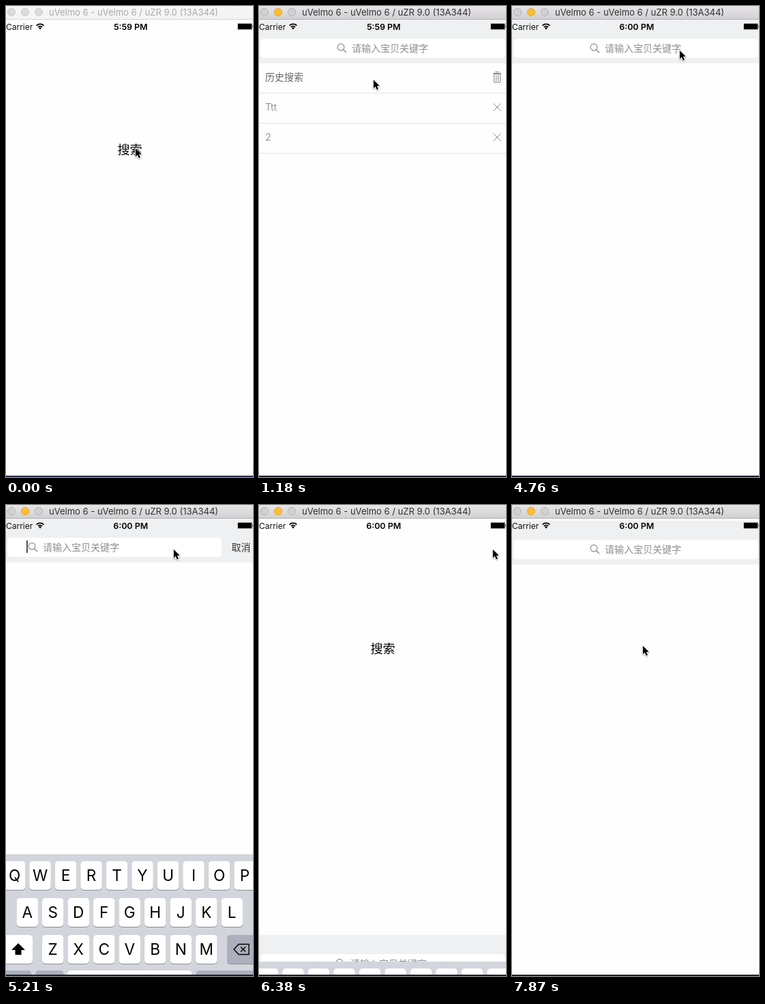
Recreate the animation shown at these times as an HTML page with a canvas. Size 362 px wide and 689 px high, loop 8000 ms.

```html
<!DOCTYPE html>
<html lang="zh">
<head>
<meta charset="utf-8">
<title>Search sheet</title>
<style>
  html, body { margin: 0; width: 100%; height: 100%; overflow: hidden; background: #fff; }
  canvas { display: block; width: 362px; height: 689px; }
</style>
</head>
<body>
<canvas id="stage"></canvas>
<script>
const W = 362, H = 689, LOOP = 8000;
const SCREEN_TOP = 20, SCREEN_H = 667, KEYS_H = 216;
const LATIN = 'Inter, Roboto, sans-serif';
const HAN = '"Noto Sans CJK SC", "Noto Sans CJK", sans-serif';

const canvas = document.getElementById('stage');
const ctx = canvas.getContext('2d');
const dpr = window.devicePixelRatio || 1;
canvas.width = W * dpr;
canvas.height = H * dpr;

// Bursts of motion: first step, last step, number of steps
const BURSTS = [
  [150, 1180, 8], [1630, 2530, 7], [2820, 2820, 1], [3270, 3570, 3],
  [4760, 5790, 8], [5940, 5940, 1], [6240, 7270, 8], [7570, 7870, 3]
];
const STEPS = [0];
for (const [from, to, n] of BURSTS)
  for (let i = 0; i < n; i++) STEPS.push(n > 1 ? from + (to - from) * i / (n - 1) : from);

// Pointer path: time, x, y
const PATH = [
  [0, 189, 207], [590, 189, 207], [1180, 167, 107], [1560, 167, 107],
  [1860, 215, 120], [2080, 265, 127], [2300, 318, 119], [2530, 343, 107],
  [3200, 343, 107], [3420, 280, 78], [3570, 238, 54], [4700, 238, 54],
  [4760, 245, 64], [5360, 245, 64], [5940, 342, 64], [6390, 342, 64],
  [7270, 191, 205], [LOOP, 191, 205]
];

const lerp = (a, b, p) => a + (b - a) * p;

// Critically damped spring from 0 to 1
function spring(t, start, speed = 16.2) {
  const x = Math.max(0, t - start) / 1000 * speed;
  return 1 - (1 + x) * Math.exp(-x);
}

function hold(t) {
  let held = 0;
  for (const s of STEPS) if (s <= t + 8) held = s;
  return held;
}

function pointerAt(t) {
  const i = PATH.findIndex(k => k[0] > t);
  const a = PATH[i - 1], b = PATH[i], p = (t - a[0]) / (b[0] - a[0]);
  return [lerp(a[1], b[1], p), lerp(a[2], b[2], p)];
}

function rect(x, y, w, h, color) {
  ctx.fillStyle = color;
  ctx.fillRect(x, y, w, h);
}

function pill(x, y, w, h, r, color) {
  ctx.fillStyle = color;
  ctx.beginPath();
  ctx.roundRect(x, y, w, h, r);
  ctx.fill();
}

function text(str, x, y, size, color, { font = LATIN, weight = 400, align = 'left' } = {}) {
  ctx.font = `${weight} ${size}px ${font}`;
  ctx.textAlign = align;
  ctx.fillStyle = color;
  ctx.fillText(str, x, y);
}

const han = (str, x, y, size, color, align) => text(str, x, y, size, color, { font: HAN, align });

function trace(points, close) {
  ctx.beginPath();
  points.forEach(([x, y], i) => i ? ctx.lineTo(x, y) : ctx.moveTo(x, y));
  if (close) ctx.closePath();
}

function line(points, color, width) {
  trace(points);
  ctx.strokeStyle = color;
  ctx.lineWidth = width;
  ctx.stroke();
}

function disc(x, y, r, fill, stroke, width = 1) {
  ctx.beginPath();
  ctx.arc(x, y, r, 0, Math.PI * 2);
  if (fill) { ctx.fillStyle = fill; ctx.fill(); }
  if (stroke) { ctx.strokeStyle = stroke; ctx.lineWidth = width; ctx.stroke(); }
}

function titleBar(active) {
  const g = ctx.createLinearGradient(0, 0, 0, 20);
  g.addColorStop(0, active ? '#e7e5e8' : '#f6f6f6');
  g.addColorStop(1, active ? '#d1cfd2' : '#f4f4f4');
  rect(0, 0, W, 20, g);
  rect(0, 19, W, 1, active ? '#b3b1b4' : '#d3d3d3');
  for (const x of [8, 28, 48]) {
    if (active && x === 28) disc(x, 9, 5.6, '#fdbd34', '#dfa12c', 0.8);
    else disc(x, 9, 5.6, active ? '#d2d0d3' : '#dbdbdb', active ? '#b2b0b3' : '#cbcbcb', 0.9);
  }
  text('uVelmo 6 - uVelmo 6 / uZR 9.0 (13A344)', 63, 14, 13, active ? '#303031' : '#a9a9a9');
}

function statusBar(clock) {
  text('Carrier', 0, 34.5, 12, '#111');
  ctx.strokeStyle = '#000';
  ctx.lineWidth = 1.8;
  for (const r of [4.4, 7.6]) {
    ctx.beginPath();
    ctx.arc(50, 34, r, -Math.PI * 0.75, -Math.PI * 0.25);
    ctx.stroke();
  }
  ctx.beginPath();
  ctx.moveTo(50, 34.5);
  ctx.arc(50, 34, 2.6, -Math.PI * 0.78, -Math.PI * 0.22);
  ctx.fillStyle = '#000';
  ctx.fill();
  text(clock, 182.7, 34.5, 12.4, '#000', { weight: 600, align: 'center' });
  pill(339, 25, 22, 10, 1.5, '#b5b5b5');
  rect(340, 26, 20, 8, '#000');
  rect(361, 28, 1, 4, '#777');
}

function cross(y) {
  line([[343.5, y - 5.5], [354.5, y + 5.5]], '#8c8c8c', 1);
  line([[354.5, y - 5.5], [343.5, y + 5.5]], '#8c8c8c', 1);
}

function trash() {
  ctx.strokeStyle = '#858585';
  ctx.lineWidth = 1;
  ctx.strokeRect(344.5, 99.5, 9, 12);
  line([[343, 98.5], [355, 98.5]], '#858585', 1);
  line([[346, 96.5], [352, 96.5]], '#858585', 1);
  for (const x of [347.5, 350.5]) line([[x, 101], [x, 110]], '#858585', 1);
}

function history() {
  han('历史搜索', 9, 109, 14, '#666');
  trash();
  text('Ttt', 9, 153, 14.5, '#999');
  text('2', 9, 197, 14.5, '#999');
  cross(148);
  cross(192);
  for (const y of [127, 171, 215]) rect(0, y, W, 1, '#e4e4e4');
}

function searchHeader(s) {
  rect(0, 20, W, 64, '#eff0f2');
  pill(2, 48, s.editing ? 314 : 359, 28, 5, '#fff');
  const x = lerp(136, 31, s.shift);
  disc(x - 16, 60.3, 4.9, null, '#8e8e93', 1.2);
  line([[x - 12.5, 63.8], [x - 8, 68.2]], '#8e8e93', 1.5);
  han('请输入宝贝关键字', x, 66.6, 14, '#8e8e93');
  if (s.caret) rect(30, 52, 1.7, 18, '#333');
  if (s.editing) han('取消', 330.5, 66.5, 14, '#333');
}

function key(x, y, w, dark) {
  pill(x, y + 1, w, 42, 5, '#8b8e93');
  pill(x, y, w, 42, 5, dark ? '#abb0bc' : '#fff');
}

function letters(row, x, y) {
  [...row].forEach((ch, i) => {
    const cx = x + i * 37.5;
    key(cx - 15.75, y, 31.5);
    text(ch, cx, y + 29, 22.5, '#000', { align: 'center' });
  });
}

function smiley(x, y) {
  disc(x, y, 9, null, '#000', 1.3);
  disc(x - 3.2, y - 3, 1.4, '#000');
  disc(x + 3.2, y - 3, 1.4, '#000');
  ctx.beginPath();
  ctx.arc(x, y + 0.8, 6, 0, Math.PI);
  ctx.closePath();
  ctx.lineWidth = 1.2;
  ctx.stroke();
  line([[x - 5, y + 3.4], [x + 5, y + 3.4]], '#000', 1);
}

function keyboard(top) {
  ctx.save();
  ctx.translate(0, top);
  rect(0, 0, W, KEYS_H, '#d2d5db');
  letters('QWERTYUIOP', 12.5, 10);
  letters('ASDFGHJKL', 31.2, 64);
  letters('ZXCVBNM', 68.7, 118);

  key(-4, 118, 43);
  trace([[18, 130], [28, 140], [22.5, 140], [22.5, 147], [13.5, 147], [13.5, 140], [8, 140]], true);
  ctx.fillStyle = '#000';
  ctx.fill();

  key(324, 118, 43, true);
  trace([[334, 139], [341, 131.5], [356, 131.5], [356, 146.5], [341, 146.5]], true);
  ctx.strokeStyle = '#000';
  ctx.lineWidth = 1.4;
  ctx.stroke();
  line([[344, 135.5], [351, 142.5]], '#000', 1.4);
  line([[351, 135.5], [344, 142.5]], '#000', 1.4);

  key(-4, 170, 41, true);
  text('123', 17, 196.5, 16, '#000', { align: 'center' });
  key(43.5, 170, 41, true);
  smiley(64, 191);
  key(90, 170, 182.5);
  text('space', 181.5, 196, 16, '#000', { align: 'center' });
  key(278.5, 170, 90, true);
  text('Search', 322, 196, 16, '#7d818a', { align: 'center' });
  ctx.restore();
}

function pointer([x, y]) {
  ctx.save();
  ctx.translate(x + 0.8, y + 1);
  ctx.scale(0.86, 0.86);
  trace([[0, 0], [0, 14.5], [3.3, 11.4], [5.7, 16.8], [8.2, 15.7], [5.9, 10.4], [10.3, 10.2]], true);
  ctx.shadowColor = 'rgba(0,0,0,.35)';
  ctx.shadowBlur = 2 * dpr;
  ctx.shadowOffsetY = dpr;
  ctx.lineJoin = 'round';
  ctx.strokeStyle = '#fff';
  ctx.lineWidth = 2;
  ctx.stroke();
  ctx.shadowColor = 'transparent';
  ctx.fillStyle = '#000';
  ctx.fill();
  ctx.restore();
}

function stateAt(t) {
  const closing = t >= 6240;
  const show = t < 6240 ? spring(t, 230) : t < 7500 ? 1 - spring(t, 6136) : spring(t, 7405);
  const keys = closing ? 1 - spring(t, 6136) : spring(t, 5010);
  const shift = closing ? 1 - spring(t, 6136, 23.6) : spring(t, 5010, 15);
  return {
    active: t >= 150,
    clock: t < 2070 ? '5:59 PM' : '6:00 PM',
    sheetY: Math.round((1 - show) * SCREEN_H),
    keysY: SCREEN_TOP + SCREEN_H - Math.round(keys * KEYS_H),
    shift,
    editing: t >= 5010 && !closing,
    caret: t >= 5010 && t < 5940,
    history: t < 2820
  };
}

function draw(t) {
  const s = stateAt(t), bottom = SCREEN_TOP + SCREEN_H;
  ctx.setTransform(dpr, 0, 0, dpr, 0, 0);
  rect(0, 0, W, H, '#fefefe');
  han('搜索', 181.5, 217, 18, '#000', 'center');

  if (s.sheetY < SCREEN_H) {
    ctx.save();
    ctx.translate(0, s.sheetY);
    rect(0, SCREEN_TOP, W, SCREEN_H, '#fefefe');
    searchHeader(s);
    if (s.history) history();
    ctx.restore();
  }
  if (s.keysY < bottom) keyboard(s.keysY);

  statusBar(s.clock);
  titleBar(s.active);
  rect(0, bottom, W, 2, s.active ? '#20202f' : '#2b2d4a');
  pointer(pointerAt(t));
}

const began = performance.now();
function tick() {
  draw(hold((performance.now() - began) % LOOP));
  requestAnimationFrame(tick);
}
tick();
</script>
</body>
</html>
```
